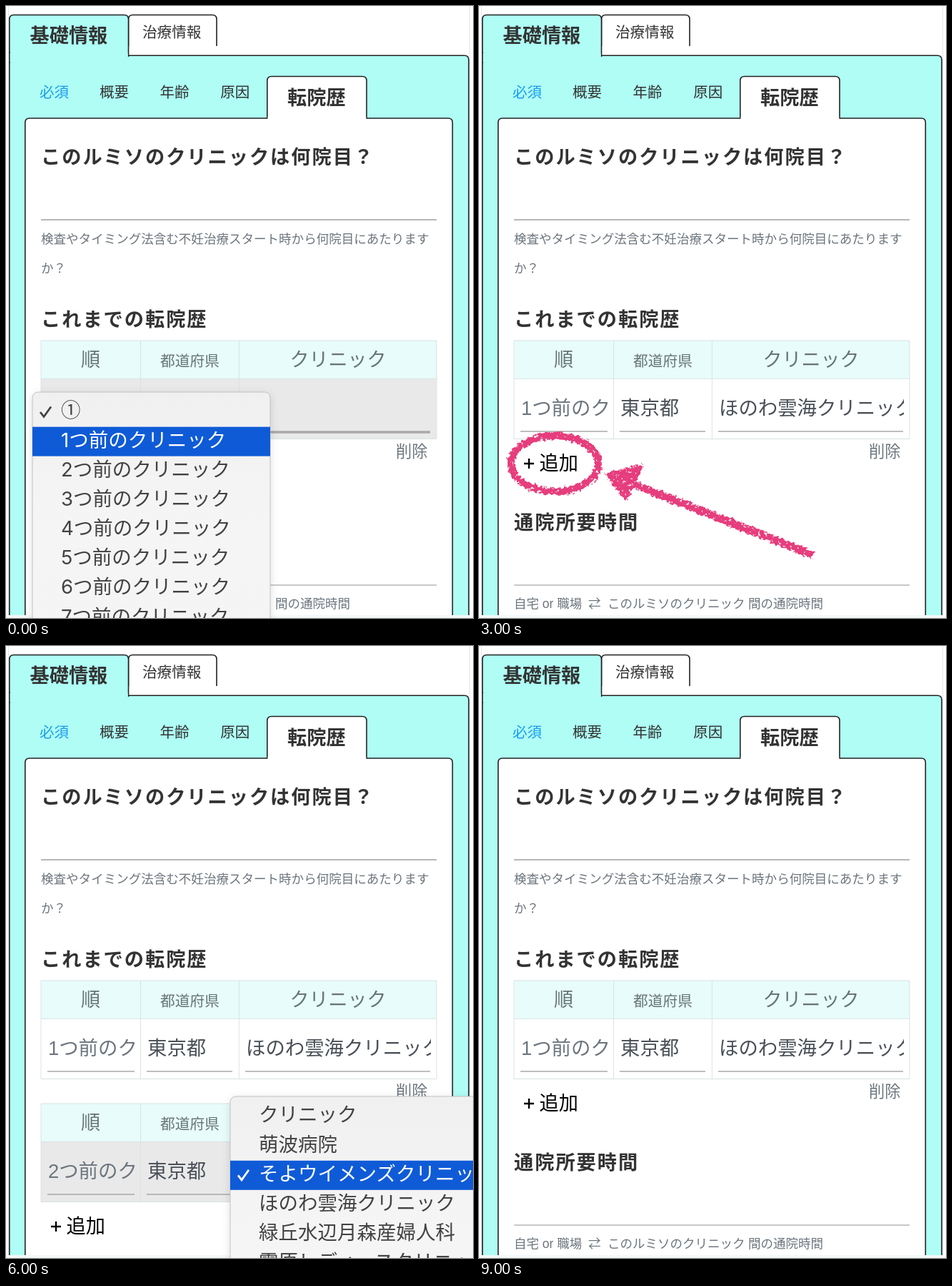
These frames come from a looping animation (654 px wide and 856 px high, 10000 ms). An HTML page:

```html
<!DOCTYPE html>
<html lang="ja">
<head>
<meta charset="utf-8">
<style>
html, body { margin: 0; width: 100%; height: 100%; overflow: hidden; background: #fff; }
svg { display: block; width: 654px; height: 856px; }
text { font-family: "Liberation Sans", "Noto Sans CJK JP", "Noto Sans CJK", sans-serif; white-space: pre; }
.menu text { font-family: Inter, "Noto Sans CJK JP", "Noto Sans CJK", sans-serif; }
.menu text.cjk { font-family: "Noto Sans CJK JP", "Noto Sans CJK", sans-serif; }
.shadow { filter: drop-shadow(0 3px 6px rgba(0, 0, 0, .12)); }
</style>
</head>
<body>
<svg viewBox="0 0 654 856" xmlns="http://www.w3.org/2000/svg">
  <defs>
    <linearGradient id="sheet" x2="0" y2="1">
      <stop stop-color="#f0f0f0"/><stop offset=".2" stop-color="#f5f5f5"/><stop offset="1" stop-color="#f4f4f4"/>
    </linearGradient>
    <filter id="chalk" filterUnits="userSpaceOnUse" x="0" y="560" width="654" height="296">
      <feTurbulence type="fractalNoise" baseFrequency=".22" numOctaves="3" seed="4" result="noise"/>
      <feDisplacementMap in="SourceGraphic" in2="noise" scale="8" xChannelSelector="R" yChannelSelector="G" result="rough"/>
      <feColorMatrix in="noise" values="0 0 0 0 0  0 0 0 0 0  0 0 0 0 0  0 0 7 0 -1.5" result="grain"/>
      <feComposite in="rough" in2="grain" operator="in"/>
    </filter>
  </defs>
  <g id="page"></g>
  <g id="view"></g>
</svg>
<script>
const INK = '#333', GRAY = '#6c757d', FIELD = '#495057', AQUA = '#affdf5', PINK = '#e63e7d', BLUE = '#0f5bd7';
const STEP = 172, PITCH = 41.15;
const CLINIC_A = 'ほのわ雲海クリニック', CLINIC_B = 'そよウイメンズクリニック';

// cy is the middle of the line of text
const text = (x, cy, size, s, fill = INK, extra = '') =>
  `<text x="${x}" y="${cy + size * 0.38}" font-size="${size}" fill="${fill}" ${extra}>${s}</text>`;
const bold = (x, cy, s, gap = 0) => text(x, cy, 27.2, s, INK, `font-weight="700" letter-spacing="${gap}"`);
const mid = (x, cy, size, s) => text(x, cy, size, s, '#687476', 'text-anchor="middle"');
const rect = (x, y, w, h, fill, extra = '') =>
  `<rect x="${x}" y="${y}" width="${w}" height="${h}" fill="${fill}" ${extra}/>`;
const path = (d, stroke, width, fill = 'none') =>
  `<path d="${d}" stroke="${stroke}" stroke-width="${width}" fill="${fill}"/>`;
const rule = (x1, x2, y, w = 1.6, color = '#b5b7b9') => path(`M${x1} ${y}H${x2}`, color, w);
// box with rounded top corners and an open bottom
const tab = (l, t, r, b, fill) =>
  path(`M${l} ${b}V${t + 6}q0 -6 6 -6H${r - 6}q6 0 6 6V${b}`, '#222', 1.6, fill);

function drawPage() {
  return path('M3.5 0V856M649.5 0V856', '#e6e6e6', 1)
    + tab(171.5, 12.5, 295, 56, '#fff')
    + tab(4.8, 69.3, 648, 852, AQUA)
    + tab(4.8, 12.5, 171.5, 71, AQUA)
    + rect(4.8, 66, 165.8, 12, AQUA) + path('M4.8 64V80', '#222', 1.6)
    + tab(26.8, 157, 625.3, 852, '#fff')
    + tab(365.8, 98.5, 505, 157.8, '#fff')
    + rect(366.6, 155, 137.6, 5, '#fff')
    + rect(0, 852, 654, 4, '#f4f8f8')
    + bold(33.5, 41, '基礎情報')
    + text(191, 36, 20.6, '治療情報')
    + text(47, 120, 20.5, '必須', '#1a9cf0')
    + ['概要', '年齢', '原因'].map((s, i) => text(131 + i * 84.6, 120, 20.5, s)).join('')
    + bold(394, 128, '転院歴')
    + bold(49, 211, 'このルミソのクリニックは何院目？', 2)
    + rule(49, 603, 299, 1.8)
    + text(49, 325, 17.55, '検査やタイミング法含む不妊治療スタート時から何院目にあたります', GRAY)
    + text(49, 366, 17.55, 'か？', GRAY)
    + bold(49, 438, 'これまでの転院歴', 2);
}

const COLS = [[58, 180], [197, 317], [335, 594]];

// values: text per column, thick: which underlines are heavy
function drawRow(n, { values, active, thick = [] }) {
  const clips = COLS.map(([a, b], i) =>
    `<clipPath id="c${n}${i}"><rect x="${a}" y="522" width="${b - a + 1}" height="84"/></clipPath>`).join('');
  const cells = COLS.map(([a, b], i) => {
    const label = text(a + 1, 562, 27.4, values[i] || '', i ? FIELD : GRAY);
    const heavy = thick.includes(i);
    return `<g clip-path="url(#c${n}${i})">${label}</g>`
      + rule(a, b, heavy ? 596 : 595, heavy ? 3.4 : 1.6, heavy ? '#a9a9a9' : '#a6a9ab');
  }).join('');
  return `<g transform="translate(0 ${n * STEP})">${clips}`
    + rect(49, 468, 554, 53, '#e7fcfb')
    + rect(49, 521, 554, 85, active ? '#e9e9e9' : '#fff')
    + path('M49 468H603V605.5H49ZM49 521.3H603M188.5 468V605M326.3 468V605', '#d9e3e3', 1)
    + mid(118.5, 494, 27, '順') + mid(257.5, 496, 20.7, '都道府県') + mid(465, 494, 27, 'クリニック')
    + cells + text(546, 623, 22.2, '削除', GRAY) + '</g>';
}

function drawFoot(rows) {
  const dy = (rows - 1) * STEP;
  const add = path(`M63 ${640 + dy}h14m-7 -7v14`, '#000', 2.4) + text(84.5, 639 + dy, 27.2, '追加', '#000');
  if (rows > 1) return add;
  return add + bold(49, 722, '通院所要時間', 2) + rule(49, 603, 810)
    + text(49, 835, 17.5, '自宅 or 職場', GRAY) + text(153, 835, 17.5, '⇄', GRAY)
    + text(180, 835, 17.5, 'このルミソのクリニック', GRAY) + text(377, 835, 17.5, '間の通院時間', GRAY);
}

function drawMenu({ x, y, w, items, on, tick = 0 }) {
  const lines = items.map((s, i) => {
    const cy = y + 25 + i * PITCH, color = i === on ? '#fff' : '#424242';
    return (i === on ? rect(x, cy - 17.5, w, 41, BLUE) : '')
      + (i === tick ? path(`M${x + 11} ${cy + 3}l5 6.5l10 -14`, color, 2.8) : '')
      + text(x + 40, cy, 27.5, s, color, /[①②]/.test(s) ? 'class="cjk"' : '');
  }).join('');
  return `<g class="menu">${rect(x, y, w, 900, 'url(#sheet)', 'rx="8" stroke="#c2c2c2" stroke-width="1" class="shadow"')}${lines}</g>`;
}

const drawMark = ({ cx, cy, rx, ry, shaft, head }) =>
  `<g filter="url(#chalk)" stroke-linejoin="round">
    <ellipse cx="${cx}" cy="${cy}" rx="${rx}" ry="${ry}" fill="none" stroke="${PINK}" stroke-width="10"/>
    ${path(shaft, PINK, 11)}${path(head, PINK, 4, PINK)}</g>`;

const ORDERS = [1, 2, 3, 4, 5, 6, 7].map(n => n + 'つ前のクリニック');
const PREFS = '北海道 青森県 岩手県 宮城県 秋田県 山形県 福島県 茨城県 栃木県 群馬県 埼玉県 千葉県 東京都 神奈川県 新潟県'.split(' ');
const CLINICS = ['クリニック', '萌波病院', CLINIC_B, CLINIC_A, '緑丘水辺月森産婦人科',
  '霞原レディースクリニック', '星葉台ART Clinic', '蒼沢レディース月浜クリニック'];

const orderMenu = (n, on) => ({ x: 37, y: 540 + n * STEP, w: 333, items: ['①②'[n], ...ORDERS], on });
const prefMenu = n => ({ x: 178, y: 207, w: 190, items: ['①②'[n], ...PREFS], on: 13 });
const clinicMenu = (y, on, tick) => ({ x: 314, y, w: 360, items: CLINICS, on, tick });

const done = { values: [ORDERS[0], '東京都', CLINIC_A] };
const second = { values: [ORDERS[1], '東京都', CLINIC_B], active: true, thick: [2] };
const addMark = { cx: 106, cy: 640, rx: 61, ry: 39,
  shaft: 'M215 668L468 768', head: 'M179 655L228 643L206 691Z' };
const deleteMark = { cx: 569, cy: 795, rx: 52, ry: 33,
  shaft: 'M300 824L466 798', head: 'M499 795L454 773L465 826Z' };

// one scene per second
const SCENES = [
  { rows: [{ values: [], active: true, thick: [0, 1, 2] }], menu: orderMenu(0, 1) },
  { rows: [{ values: [ORDERS[0]], active: true, thick: [0, 1, 2] }], menu: prefMenu(0) },
  { rows: [{ values: [ORDERS[0], '東京都'], active: true, thick: [0, 1, 2] }], menu: clinicMenu(540, 3, 0) },
  { rows: [done], mark: addMark },
  { rows: [done, { values: [], active: true }], menu: orderMenu(1, 2) },
  { rows: [done, { values: [ORDERS[1]], active: true }], menu: prefMenu(1) },
  { rows: [done, { values: [ORDERS[1], '東京都'], active: true }], menu: clinicMenu(630, 2, 2) },
  { rows: [done, second] },
  { rows: [done, second], mark: deleteMark },
  { rows: [done] }
];

const drawScene = ({ rows, menu, mark }) =>
  rows.map((row, i) => drawRow(i, row)).join('') + drawFoot(rows.length)
  + (mark ? drawMark(mark) : '') + (menu ? drawMenu(menu) : '');

const view = document.getElementById('view');
document.getElementById('page').innerHTML = drawPage();
const start = performance.now();
let shown = -1;

function update(now) {
  const i = Math.floor(Math.max(0, now - start) % 10000 / 1000);
  if (i !== shown) view.innerHTML = drawScene(SCENES[shown = i]);
  requestAnimationFrame(update);
}
update(start);
</script>
</body>
</html>
```
